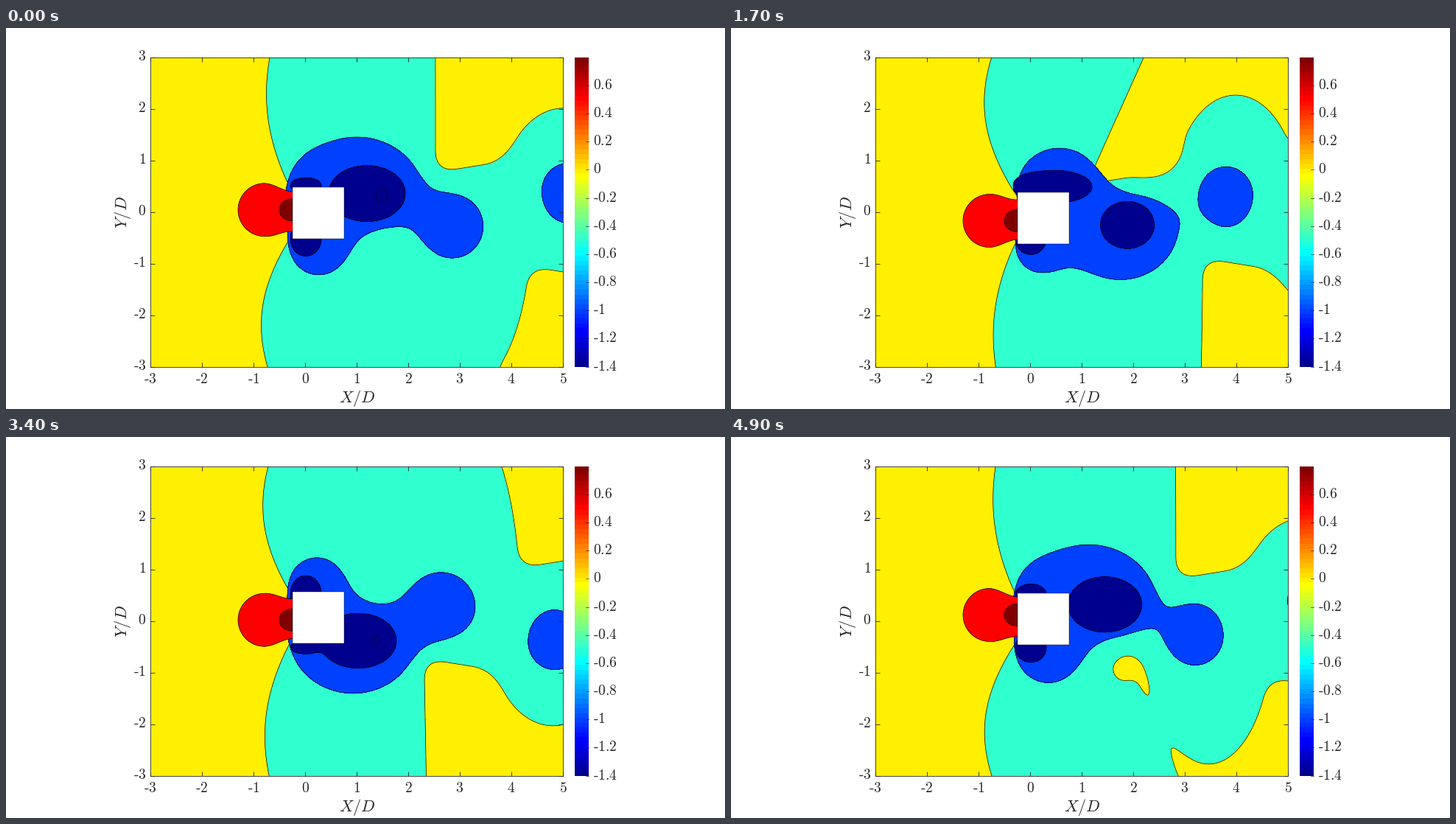
A matplotlib script for the animation above (5000 ms loop, 976x517 px).

```python
import numpy as np
import matplotlib.pyplot as plt
from matplotlib.animation import FuncAnimation
from matplotlib.patches import Circle, Polygon, Rectangle

plt.rcParams["mathtext.fontset"] = "cm"

W, H, DPI = 976, 517, 100
FRAMES, STEP = 50, 100
LEFT, RIGHT, TOP, BOTTOM, UNIT = 196, 756.4, 39.6, 459.6, 70
MID = (TOP + BOTTOM) / 2
HALF = 1.1775                      # half a shedding cycle in seconds
INK = "#262626"
YELLOW, TEAL, BLUE, NAVY = "#ffef00", "#30ffcf", "#0040ff", "#00008f"
RED, MAROON = "#ff0000", "#800000"
LINE = 0.5

GX, GY = np.meshgrid(np.arange(376, 761, 2.0), MID + np.arange(-212, 213, 2.0))


def ellipse(dx, dy, rx, ry):
    """Approximate signed distance to an ellipse, negative inside."""
    q = np.hypot(dx / rx, dy / ry) + 1e-6
    return q * (q - 1) / (np.hypot(dx / rx**2, dy / ry**2) + 1e-9)


def blend(a, b, k):
    """Union of two distance fields with a rounded joint."""
    h = np.clip(0.5 + 0.5 * (b - a) / k, 0, 1)
    return b * (1 - h) + a * h - k * h * (1 - h)


def wave(t, start):
    return np.sin(np.pi * (t - start) / HALF)


def vortices(t):
    """Age of every vortex and the height above the axis on its own side."""
    half = int(t // HALF)
    for j in range(-2, 3):
        side = 1 if (j + half) % 2 == 0 else -1
        yield t - half * HALF + j * HALF, side, side * (MID - GY)


def low_cell(age, height):
    """Low pressure that swells behind the body, then drifts off and shrinks."""
    swell = np.exp(-((age - 0.15) / (0.8 if age < 0.15 else 0.68)) ** 2)
    birth = np.clip((age + 2.4) / 0.6, 0.2, 1)
    rx = (36 + 58 * swell) * birth
    x = np.interp(age, [-1.3, -1.03, -0.65, -0.13, 0.15, 0.52, 0.9, 1.18, 1.7, 2.36, 3.3],
                  [421, 429, 446, 464, 480, 528, 574, 606, 672, 764, 905])
    dy = height - np.interp(age, [-1.25, -0.1, 1.4, 2.2], [46, 17, 20, 28])
    ry = np.where(dy > 0, 38 + 48 * swell, 43) * birth
    return ellipse(GX - max(x, 384 + rx), dy, rx, ry)


def core(age, height):
    """Lowest pressure inside a vortex."""
    rx = 52 * (1 - max(age, 0) ** 2 / 0.91)
    ry = 38 * np.sqrt(1 - ((age - 0.05) / 0.87) ** 2)
    x = max(490 + 92 * age, 386 + rx)
    return ellipse(GX - x, height - 25 + 14 * age, rx, ry)


def sheet(age, height):
    """Thin layer on the side wall of the body that pulses with the shedding."""
    top = 53 + 9 * wave(age, -1.45 - HALF / 2)
    return ellipse(GX - 407, height - 36, 21, top - 36)


def column(age, height):
    """Band around a vortex that reaches the outer flow until it closes up."""
    lean = 0.45 * np.clip(-age / 0.65, 0, 1) ** 2 * (height - 100)
    front = 583 + 110 * age + 350 * max(-0.75 - age, 0) + lean
    dx = GX - front + 85
    rx = np.where((dx < 0) & (age < HALF), 400, 85)
    ry = 118 + 100 * np.exp((HALF - age) / 0.33)
    return ellipse(dx, np.maximum(height - 20, 0), rx, ry)


def gap(age, height):
    """Recovered pressure that opens up between two columns."""
    r = np.clip(12 + 80 * (age + 1.03), 1, 45)
    return ellipse(GX - 530 - 100 * (age + 1.03), height - 50 - r, r, r)


def pressure_fields(t):
    strip = np.abs(MID - GY) - 50 - 0.16 * (GX - 560)
    teal = {1: strip, -1: strip}
    openings = blue = navy = np.full(GX.shape, 1e3)
    for age, side, height in vortices(t):
        blue = blend(blue, low_cell(age, height), 54)
        if -HALF <= age < HALF:
            navy = blend(navy, sheet(age, height), 12)
        if -0.8 < age < 0.91:
            navy = blend(navy, core(age, height), 12)
        if age >= -HALF:
            teal[side] = blend(teal[side], column(age, height), 30)
        if -1.15 < age < -0.2:
            openings = np.minimum(openings, gap(age, height))
    yellow = blend(-np.where(GY < MID, teal[1], teal[-1]), openings, 15)
    return (YELLOW, yellow), (BLUE, blue), (NAVY, navy)


def upstream_curve(t, cy):
    """Edge of the undisturbed flow, swaying against the body."""
    s = np.linspace(0, 1.1, 40)
    arch = 38 * np.sin(np.pi / 2 * (s / 0.7) ** 0.9)
    sway = 7 * wave(t, 0.38 - HALF / 2) * np.sin(2.7 * s)
    upper = np.c_[388 - arch + sway, cy - 31 + (TOP - cy + 31) * s]
    lower = np.c_[388 - arch - sway, cy + 31 + (BOTTOM - cy - 31) * s]
    return np.vstack([upper[::-1], [(402, cy)], lower, [(120, 560), (120, -60)]])


def red_curve(nose, wall):
    """Round stagnation bubble that narrows towards the body."""
    x = 351 - 36 * np.cos(np.linspace(0, np.pi / 2, 30))
    neck = np.linspace(351, 392, 20)
    width = np.r_[np.sqrt(36**2 - (x - 351) ** 2),
                  31.5 + 4.5 * np.cos(np.pi * (neck - 351) / 38)]
    x = np.r_[x, neck]
    axis = nose + (wall - nose) * np.clip((x - 351) / 38, 0, 1)
    return np.vstack([np.c_[x, axis - width], np.c_[x, axis + width][::-1]])


def maroon_curve(nose):
    a = np.linspace(np.pi / 2, 3 * np.pi / 2, 30)
    return np.c_[389 + 18 * np.cos(a), nose + 15 * np.sin(a)]


fig = plt.figure(figsize=(W / DPI, H / DPI), dpi=DPI, facecolor="white")
stage = fig.add_axes([0, 0, 1, 1])
stage.axis("off")
plot = fig.add_axes([LEFT / W, 1 - BOTTOM / H, (RIGHT - LEFT) / W, (BOTTOM - TOP) / H],
                    facecolor=TEAL)
plot.set(xlim=(LEFT, RIGHT), ylim=(BOTTOM, TOP))
plot.set_axisbelow(False)
plot.set_xticks([LEFT + UNIT * i for i in range(9)], [])
plot.set_yticks([TOP + UNIT * i for i in range(7)], [])
plot.set(xlim=(LEFT, RIGHT), ylim=(BOTTOM, TOP))
plot.tick_params(direction="in", length=4, width=0.6, color=INK, top=True, right=True)
for spine in plot.spines.values():
    spine.set(linewidth=0.6, color=INK)


def label(x, y, text, size=14, **kw):
    stage.text(x, y, text, fontsize=size, color=INK, va="center", **kw)


for i in range(9):
    label(LEFT + UNIT * i, 476, rf"$\text{{{i - 3}}}$", ha="center")
for i in range(7):
    label(190, TOP - 1 + UNIT * i, rf"$\text{{{3 - i}}}$", ha="right")
label(476.5, 502, "$X/D$", 16, ha="center")
label(158, MID, "$Y/D$", 16, ha="center", rotation=90)

level = np.arange(64, 0, -1)[:, None, None] / 64
jet = np.clip(1.5 - np.abs(4 * level - np.array([3, 2, 1])), 0, 1)
stage.imshow(jet, aspect="auto", interpolation="nearest", extent=(772, 791, BOTTOM, TOP))
for i in range(11):
    value = round(0.6 - 0.2 * i, 1) + 0
    y = TOP + (0.8 - value) * (BOTTOM - TOP) / 2.2
    label(797, y - 0.5, rf"$\text{{{value:g}}}$", ha="left")
    stage.plot([787, 791], [y, y], color=INK, lw=0.5)
stage.set(xlim=(0, W), ylim=(H, 0))


def outline(color, z):
    return plot.add_patch(Polygon([[0, 0], [1, 1]], fc=color, ec="black", lw=LINE, zorder=z))


upstream, red, maroon = outline(YELLOW, 1), outline(RED, 1.6), outline(MAROON, 1.7)
ring = plot.add_patch(Circle((0, 0), 1, fc="none", ec="black", lw=LINE, zorder=1.5))
body = plot.add_patch(Rectangle((389, 0), UNIT, UNIT, fc="white", ec="black", lw=0.3, zorder=2))
drawn = []


def update(frame):
    while drawn:
        drawn.pop().remove()
    t = frame * STEP / 1000

    for z, (color, field) in enumerate(pressure_fields(t)):
        drawn.append(plot.contourf(GX, GY, field, levels=[-1e7, 0], colors=[color],
                                   zorder=1.1 + z / 10))
        drawn.append(plot.contour(GX, GY, field, levels=[0], colors="black",
                                  linewidths=LINE, linestyles="solid", zorder=1.15 + z / 10))

    # The strongest vortex briefly shows one more contour
    age, side, _ = min(vortices(t), key=lambda v: abs(v[0]))
    ring.set_visible(abs(age) < 0.19)
    ring.set_radius(8 * np.sqrt(max(0, 1 - (age / 0.19) ** 2)))
    ring.center = (510 + 66 * age, MID - side * (22.5 - 27 * age))

    cy = MID - 9.45 * wave(t, 0.07)
    nose = MID - 12 * wave(t, -0.09)
    body.set_y(cy - UNIT / 2)
    upstream.set_xy(upstream_curve(t, cy))
    red.set_xy(red_curve(nose, (nose + cy) / 2))
    maroon.set_xy(maroon_curve(nose))
    return drawn


animation = FuncAnimation(fig, update, frames=FRAMES, interval=STEP, repeat=True,
                          cache_frame_data=False)
plt.show()
```
